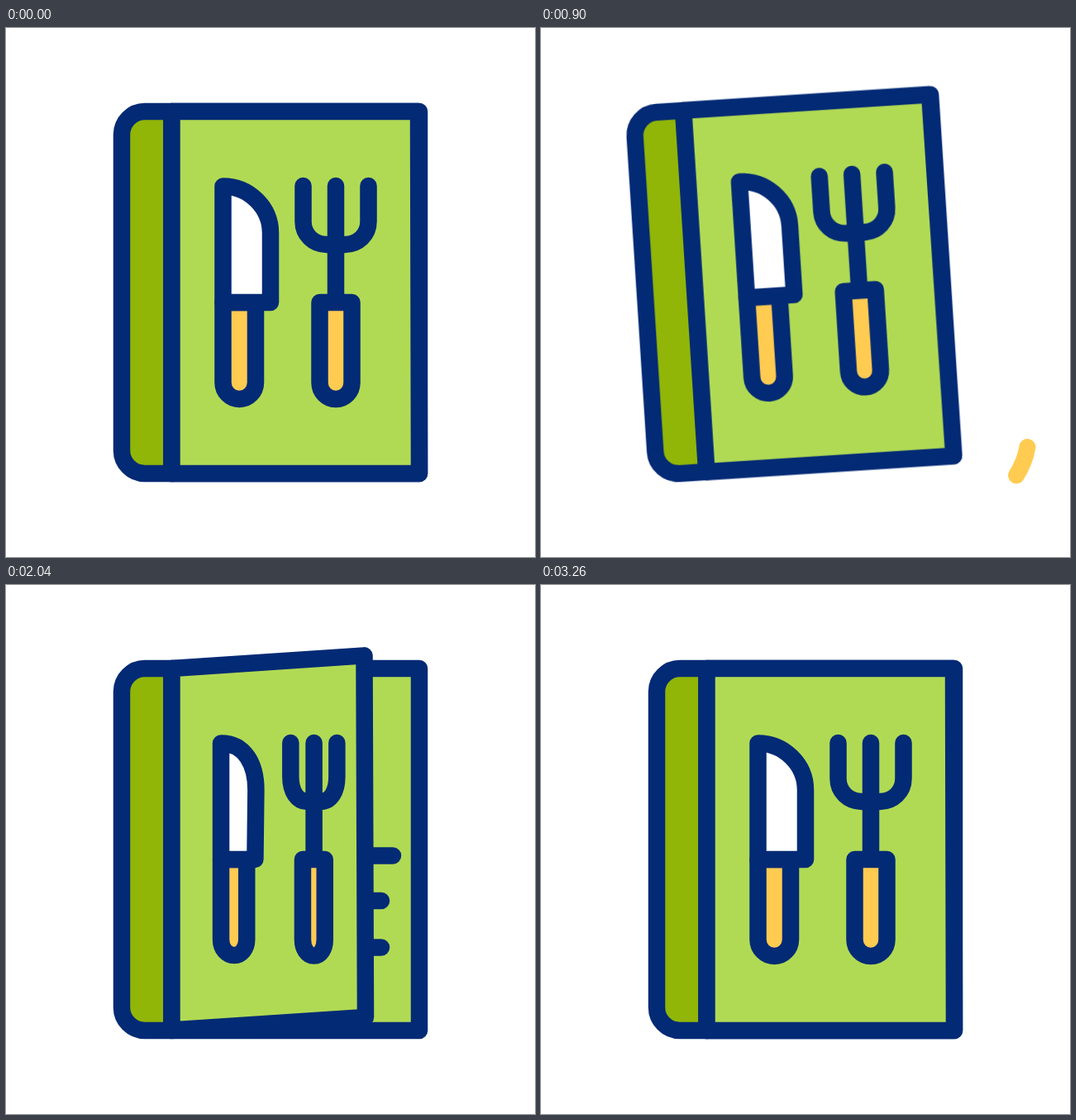
These frames come from a looping animation (640x640 px, 3600 ms). An HTML page:

```html
<!DOCTYPE html>
<html lang="en">
<head>
<meta charset="utf-8">
<title>Cookbook</title>
<style>
@property --tail { syntax: "<number>"; inherits: false; initial-value: 0; }
@property --head { syntax: "<number>"; inherits: false; initial-value: 0; }

:root {
  --navy: #032a75;
  --green: #b1da54;
  --olive: #91b607;
  --gold: #ffcb51;
  --loop: 3600ms infinite;
  --smooth: cubic-bezier(.333, 0, .667, 1);
  --out: cubic-bezier(.333, .667, .667, 1);
}
html, body { margin: 0; width: 100%; height: 100%; overflow: hidden; background: #fff; }
svg { display: block; width: 100%; height: 100%; }
path { stroke: var(--navy); stroke-width: 20.5; stroke-linecap: round; stroke-linejoin: round; fill: none; }
.olive { fill: var(--olive); }
.green { fill: var(--green); }
.gold { fill: var(--gold); }
.white { fill: #fff; }

/* rocking on the lower left corner */
.book { transform-origin: 168px 539px; animation: rock var(--loop) var(--smooth); }
@keyframes rock {
  0%, 5%, 33.889%, 100% { transform: rotate(0deg); }
  12.222%, 26.667% { transform: rotate(-5deg); }
  19.444% { transform: rotate(5deg); }
}

/* cover swinging open and shut */
.flap { d: var(--shut); animation: flap var(--loop) linear; }
@keyframes flap {
  0%, 75%, 100% { d: var(--shut); }
  37.778% { d: var(--shut); animation-timing-function: cubic-bezier(.25, .1, .1, 1); }
  62.222% { d: var(--open); }
  65.278% { d: var(--open); animation-timing-function: var(--smooth); }
}

/* cutlery crossing */
.knife { --turn: 10deg; transform-origin: 282.3px 437px; }
.fork { --turn: -12deg; transform-origin: 399px 451px; }
.knife, .fork { animation: cross var(--loop) var(--smooth); }
@keyframes cross {
  0%, 72.778%, 90.556%, 100% { transform: rotate(0deg); }
  81.667% { transform: rotate(var(--turn)); }
}

/* strokes that draw on from the head and vanish from the tail */
.swoosh {
  stroke: var(--gold);
  stroke-width: 20;
  stroke-dasharray: calc((var(--head) - var(--tail)) * 1px) 3px;
  stroke-dashoffset: calc(var(--tail) * -1px);
}
.sweep {
  animation: sweep-head var(--loop) var(--out), sweep-tail var(--loop) var(--smooth),
    sweep-show var(--loop) step-end;
}
.pull {
  animation: pull-head var(--loop) var(--out), pull-tail var(--loop) var(--smooth),
    pull-show var(--loop) step-end;
}
@keyframes sweep-head { 0%, 13.611% { --head: 0; } 22.778%, 100% { --head: 1; } }
@keyframes sweep-tail { 0%, 17.778% { --tail: 0; } 27.222%, 100% { --tail: 1; } }
@keyframes sweep-show { 0%, 27.222%, 100% { opacity: 0; } 13.7% { opacity: 1; } }
@keyframes pull-head { 0%, 33.889% { --head: 0; } 40%, 100% { --head: 1; } }
@keyframes pull-tail { 0%, 37.778% { --tail: 0; } 51.111%, 100% { --tail: 1; } }
@keyframes pull-show { 0%, 51.111%, 100% { opacity: 0; } 34% { opacity: 1; } }
</style>
</head>
<body>
<svg viewBox="0 0 640 640">
  <path class="swoosh sweep" pathLength="1" d="M362 576C422 604 492 604 544 571.5C568 557 584 533 588.5 507"/>
  <path class="swoosh pull" pathLength="1" d="M556.5 488C557 555 488 606 405 610C391 610.5 378 609.5 366 607.5"/>

  <g class="book">
    <path class="green" d="M500 101H200.5V539H500Z"/>
    <path class="olive" d="M200.5 101H168A28 28 0 0 0 140 129V511A28 28 0 0 0 168 539H200.5Z"/>
    <path d="M400 327.5H468M400 382H454M400 438.5H454"/>

    <path class="flap green" style="--shut:path('M200.5 101L499 101L500 539L200.5 539Z');--open:path('M200.5 101L432 85L433.5 522.5L200.5 538.5Z')"/>

    <g class="fork">
      <path class="flap" style="--shut:path('M359.5 191L359.5 234C359.5 250 372 262 388 262L410 262C426 262 438.5 250 438.5 234L438.5 191M399 191L399 332');--open:path('M344 191L344 232C344 250 352 262 364 262L380 262C392 262 399.5 250 399.5 232L399.5 191M372 191L372 332')"/>
      <path class="flap gold" style="--shut:path('M379.5 332L379.5 429C379.5 440 388 449 399 449C410 449 418.5 440 418.5 429L418.5 332Z');--open:path('M358.5 332L358.5 429C358.5 440 364 448.5 372 448.5C380 448.5 385 440 385 429L385 332Z')"/>
    </g>

    <g class="knife">
      <path class="flap gold" style="--shut:path('M262.5 332L262.5 429C262.5 440 271.5 449 282.3 449C293 449 302 440 302 429L302 332Z');--open:path('M260 332L260 429C260 440 267 448 276 448C284 448 291 440 291 429L291 332Z')"/>
      <path class="flap white" style="--shut:path('M262.5 191.5C294 191.5 320 217 320 248L320 332L262.5 332Z');--open:path('M260 191.5C289 191.5 302 217 302 248L301 332L260 332Z')"/>
    </g>
  </g>
</svg>
</body>
</html>
```
